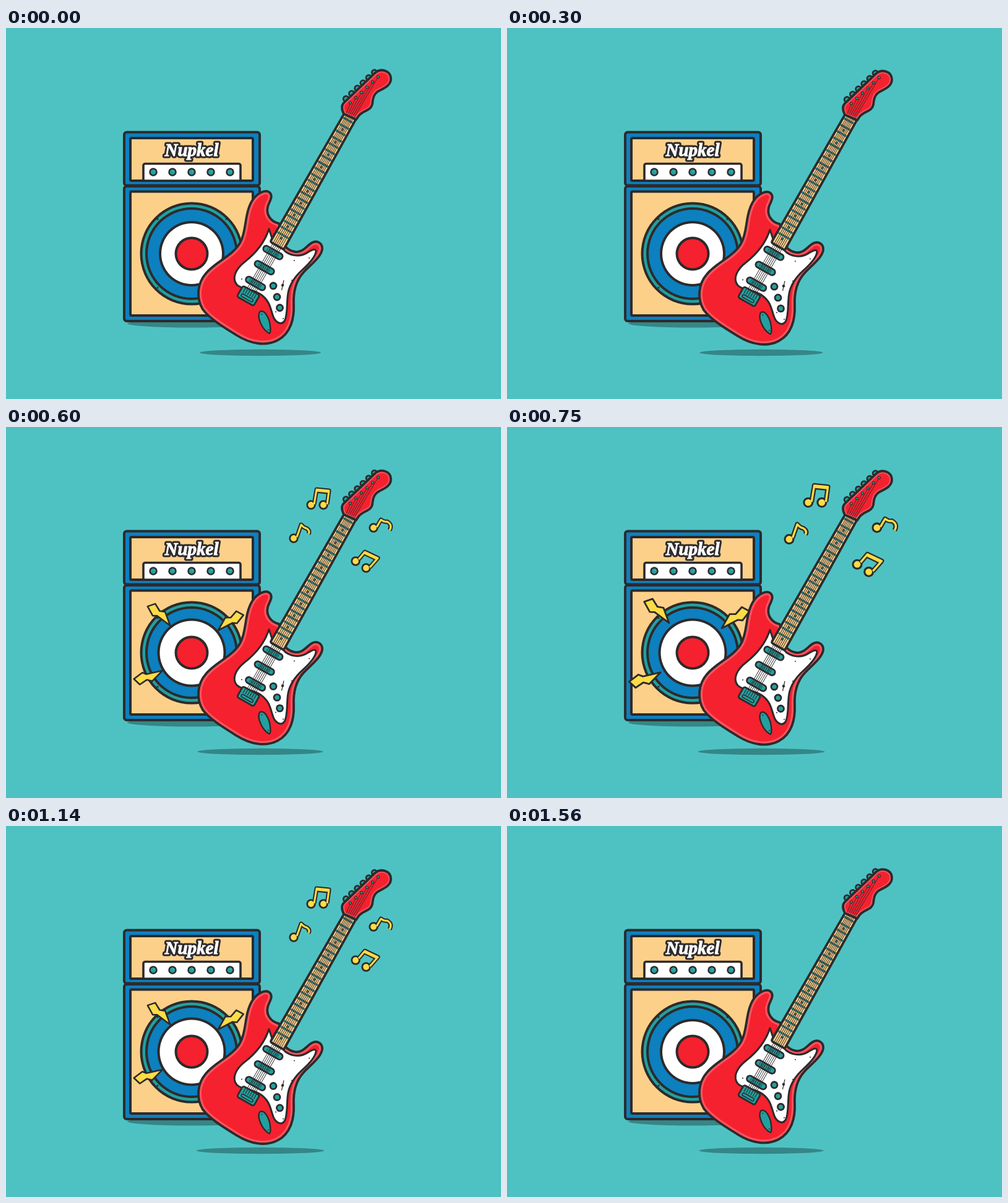
An HTML page with a canvas for the animation above (1590 ms loop, 800 by 600 pixels).

```html
<!DOCTYPE html>
<html lang="en">
<head>
<meta charset="utf-8">
<title>Guitar and amp</title>
<style>
html, body { margin: 0; width: 100%; height: 100%; overflow: hidden; background: #4ec2c3; }
canvas { display: block; }
</style>
</head>
<body>
<canvas id="stage" width="800" height="600"></canvas>
<script>
const ctx = document.getElementById('stage').getContext('2d');
const LOOP = 1590, STEP = 30, BEAT = 530;
const C = {
  bg: '#4ec2c3', ink: '#2d2a2b', blue: '#0d80bf', cream: '#fdd08a', red: '#f6212f',
  pink: '#fb5560', teal: '#22a0a0', shade: '#358687', white: '#fff', yellow: '#fddc45'
};

const BODY = new Path2D('M441 316C427 313 420 301 423 289C425 281 432 274 427 267C420 259 405 268 398 279' +
  'C385 300 389 328 379 346C368 368 338 378 323 397C309 413 307 437 318 455C329 470 352 484 373 497' +
  'C395 511 420 515 439 505C460 494 466 470 465 447C464 425 469 408 481 395C491 384 509 371 511 358' +
  'C512 348 503 343 495 347C486 352 480 363 468 362C460 361 455 357 452 354Z');
const GUARD = new Path2D('M425 325C418 347 404 364 386 378C372 389 364 404 373 415C382 424 398 421 412 431' +
  'C426 441 427 452 431 464C434 475 444 482 450 474C456 464 453 444 456 428C459 412 468 401 479 391' +
  'C489 382 500 371 501 361C500 355 493 360 489 362C478 370 464 370 452 362L430 340Z');
const HEAD = new Path2D('M546 139C543 133 541 126 546 121L596 73C606 64 621 69 622 81C623 92 612 97 604 101' +
  'C593 106 593 116 592 123C590 134 577 133 570 142L566 148Z');
const JACK = new Path2D('M410 459C418 454 426 470 427 482C428 490 427 496 424 493C414 487 405 468 410 459Z');
const NECK = new Path2D('M-10.5 -240L-12.5 -3Q-12.5 0 -9.5 0L9.5 0Q12.5 0 12.5 -3L10.5 -240Z');
const BOLT = new Path2D('M-2.6 6L2.6 -6L16 -3.5L23 -9L45 0L19 5L14 10Z');
const BOLTS = [
  { x: 235, y: 288, angle: 0.83, flip: 1 },
  { x: 378, y: 301, angle: 2.47, flip: -1 },
  { x: 211.5, y: 412, angle: -0.41, flip: -1 }
];
const NOTES = [
  { stem: 'M498 125L502 101L522 103L519 125', heads: [[493, 126], [513, 126]], beam: 'M502 102.5L522 104.5' },
  { stem: 'M470 178L477 158Q481 163 486 164Q492 168 489 173', heads: [[465, 180]] },
  { stem: 'M599 162L606 150Q611 154 616 153Q625 158 620 167', heads: [[594, 163]] },
  { stem: 'M570 214L580 202L601 212L588 227', heads: [[565, 217], [582, 228]], beam: 'M579 203L600 213' }
];

function paint(path, fill, width = 4) {
  ctx.fillStyle = fill;
  ctx.fill(path);
  outline(path, C.ink, width);
}

function outline(path, color, width) {
  ctx.strokeStyle = color;
  ctx.lineWidth = width;
  ctx.stroke(path);
}

function box(x, y, w, h, r, fill, width) {
  const p = new Path2D();
  p.roundRect(x, y, w, h, r);
  paint(p, fill, width);
}

function ellipse(x, y, rx, ry, fill) {
  ctx.fillStyle = fill;
  ctx.beginPath();
  ctx.ellipse(x, y, rx, ry, 0, 0, 7);
  ctx.fill();
}

const dot = (x, y, r, fill = C.ink) => ellipse(x, y, r, r, fill);

function disc(x, y, r, fill, width = 4) {
  dot(x, y, r + width / 2);
  dot(x, y, r - width / 2, fill);
}

function line(x1, y1, x2, y2, width, color = C.ink) {
  ctx.strokeStyle = color;
  ctx.lineWidth = width;
  ctx.beginPath();
  ctx.moveTo(x1, y1);
  ctx.lineTo(x2, y2);
  ctx.stroke();
}

// Shapes lit from the rim: pale inner edge under the dark outline.
function rimmed(path, rim) {
  ctx.fillStyle = C.red;
  ctx.fill(path);
  ctx.save();
  ctx.clip(path);
  outline(path, C.pink, rim);
  ctx.restore();
  outline(path, C.ink, 3.8);
}

function scaled(cx, cy, k, draw) {
  ctx.save();
  ctx.translate(cx, cy);
  ctx.scale(k, k);
  ctx.translate(-cx, -cy);
  draw();
  ctx.restore();
}

function drawAmp(loud) {
  ellipse(300, 478, 104, 6.5, C.shade);
  box(191, 256, 219, 218, 4, C.blue);
  box(201, 264.5, 198, 200.5, 2, C.cream);
  box(191, 168.5, 219, 86, 4, C.blue);
  box(201, 178, 198, 69, 2, C.cream);
  box(222, 219.5, 157, 27.5, [3, 3, 0, 0], C.white, 3.6);
  for (let i = 0; i < 5; i++) {
    disc(238 + 31 * i, 233, 5.5, C.teal, 2.5);
    dot(239.5 + 31 * i, 231.5, 1, C.bg);
  }

  ctx.font = 'italic bold 29px "Liberation Serif", "Times New Roman", serif';
  ctx.textAlign = 'center';
  ctx.strokeStyle = C.ink;
  ctx.lineWidth = 7;
  ctx.strokeText('Nupkel', 300, 207);
  ctx.fillStyle = ctx.strokeStyle = C.white;
  ctx.lineWidth = 1;
  ctx.strokeText('Nupkel', 300, 207);
  ctx.fillText('Nupkel', 300, 207);

  disc(300, 365, 81.5, C.teal);
  for (const [x, y] of [[245, 309], [356, 309], [245, 420]]) dot(x, y, 1.6);
  disc(300, 365, 73, C.blue);
  disc(300, 365, loud ? 53.5 : 51, C.white);
  disc(300, 365, 25.5, C.red);
}

function drawBolt({ x, y, angle, flip }) {
  ctx.save();
  ctx.translate(x, y);
  ctx.rotate(angle);
  ctx.scale(1, flip);
  paint(BOLT, C.yellow, 2.6);
  ctx.restore();
}

function drawNote({ stem, heads, beam }) {
  const stemPath = new Path2D(stem);
  const beamPath = new Path2D(beam);
  outline(stemPath, C.ink, 7);
  outline(beamPath, C.ink, 8.5);
  for (const [x, y] of heads) disc(x, y, 6.3, C.yellow, 2.8);
  outline(stemPath, C.yellow, 3);
  outline(beamPath, C.yellow, 4.2);
}

function drawNeck() {
  paint(NECK, C.cream, 3.8);
  for (let i = 0; i < 20; i++) {
    const y = -233 + 11.9 * i - 0.035 * i * i;
    const half = 10.8 - 1.8 * -y / 240;
    line(-half, y, half, y, 3);
    line(-half, y, half, y, 1.6, C.teal);
    if (i % 2) disc(0, y + 5.6, 1.6, C.teal, 1);
  }
  for (let i = -2.5; i <= 2.5; i++) line(i * 2.4, -240, i * 3, 0, 0.9);
}

function drawHardware() {
  for (const y of [13, 41, 70.3]) {
    box(-17.5, y - 4.9, 34.5, 9.8, 4.9, C.teal, 2.8);
    for (let i = -2.5; i <= 2.5; i++) line(i * 4 - 0.5, y - 2.5, i * 4 - 0.5, y + 2.5, 0.8);
  }
  box(-16, 83.5, 31, 20, 3, C.teal, 2.8);
  for (let i = -2.5; i <= 2.5; i++) {
    line(i * 3, 1, i * 3 - 0.5, 84, 0.9);
    line(i * 4 - 0.5, 85, i * 4 - 0.5, 93, 1.2);
  }
  box(-11, 95, 21, 4.6, 2, C.teal, 1.6);
}

function drawHead() {
  for (let i = 0; i < 6; i++) disc(549.5 + 9.2 * i, 114.5 - 8.5 * i, 4.3, C.teal, 2.8);
  rimmed(HEAD, 7.5);
  for (let i = 0; i < 6; i++) {
    const x = 556.5 + 9 * i, y = 121 - 8.4 * i;
    line(550 + 2.5 * i, 138 + 1.4 * i, x, y, 0.9);
    disc(x, y, 2, C.teal, 1.1);
  }
}

function drawGuitar() {
  rimmed(BODY, 10);
  paint(GUARD, C.white, 3);
  for (const [x, y] of [[421, 337], [381, 406], [436, 459], [448, 470], [462, 408], [490, 372], [466, 376]])
    dot(x, y, 1);
  for (const [x, y] of [[432, 417], [438, 435], [442.5, 452.5]]) disc(x, y, 5, C.teal, 2.8);
  line(445.5, 424, 449, 408, 1.2);
  dot(447, 416, 2.2);
  paint(JACK, C.teal, 2.4);
  dot(413.5, 463, 1);
  dot(424, 488, 1);

  ctx.save();
  ctx.translate(438, 352);
  ctx.rotate(Math.atan2(118, 209));
  drawHardware();
  drawNeck();
  ctx.restore();
  drawHead();
}

function render(time) {
  const t = Math.floor((time % LOOP) / STEP) * STEP;
  const sink = 1 - Math.abs(1 - t / 1000);
  const phase = t % BEAT;
  const loud = phase >= 50 && phase < 285;
  const spread = phase < 195 ? 1 : 1.1;

  ctx.fillStyle = C.bg;
  ctx.fillRect(0, 0, 800, 600);
  ctx.lineJoin = 'round';
  drawAmp(loud);
  if (loud) {
    scaled(300, 365, spread, () => BOLTS.forEach(drawBolt));
    scaled(555, 165, spread, () => NOTES.forEach(drawNote));
  }
  ellipse(411, 525, 98 + 6 * sink, 5.2, C.shade);
  ctx.save();
  ctx.translate(0, 4 * sink);
  drawGuitar();
  ctx.restore();
}

const start = performance.now();
function tick() {
  render(performance.now() - start);
  requestAnimationFrame(tick);
}
tick();
</script>
</body>
</html>
```
